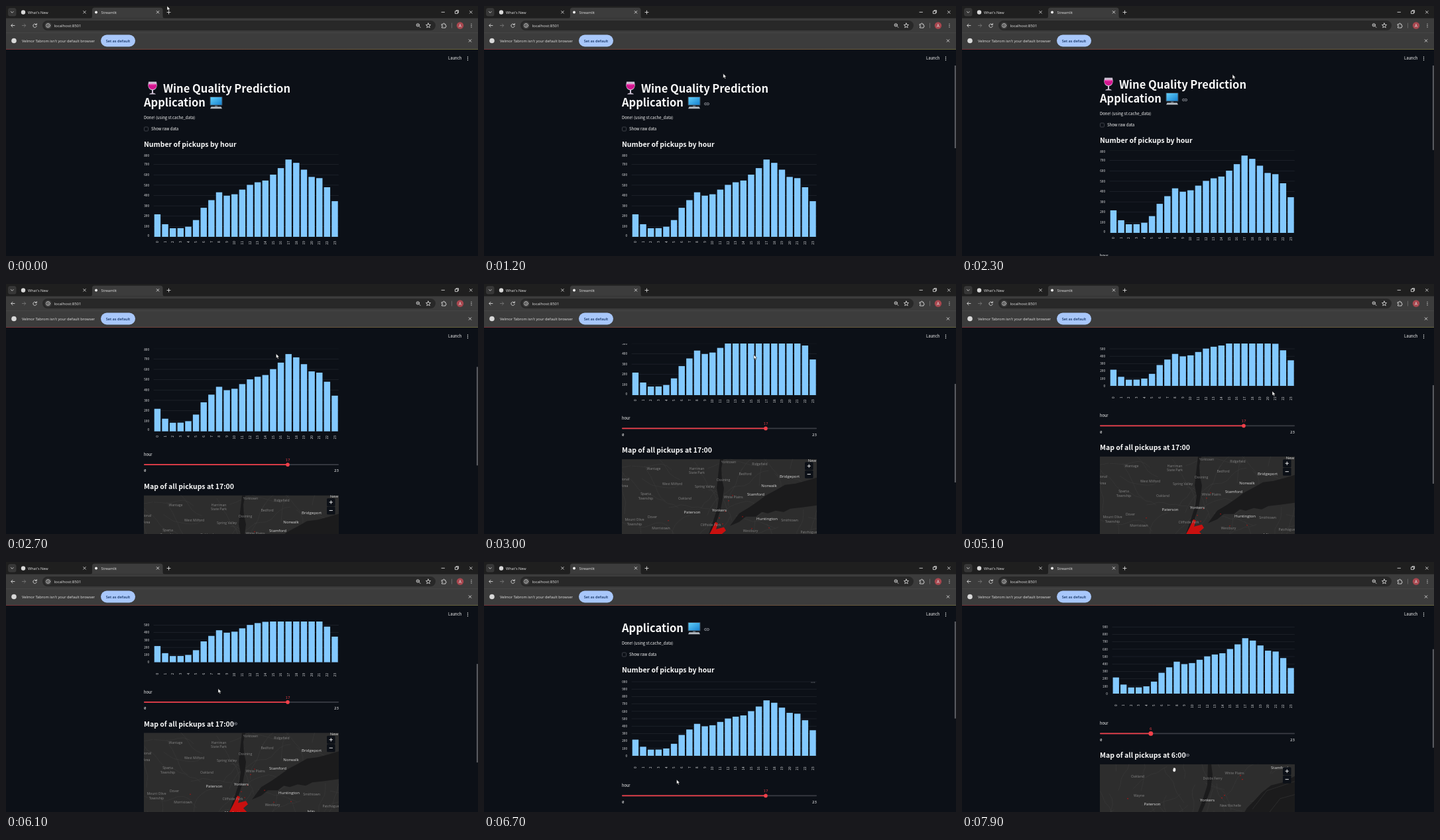
An HTML page that plays this animation: 712x378 px, repeating every 8000 ms.

```html
<!DOCTYPE html>
<html lang="en">
<head>
<meta charset="utf-8">
<title>Wine Quality Prediction</title>
<style>
  html, body { margin: 0; width: 100%; height: 100%; overflow: hidden; background: #0c1017; }
  svg { display: block; width: 100vw; height: 100vh; }
  text { font-family: "Noto Sans CJK JP", "Noto Sans CJK SC", "Noto Sans CJK", "Noto Sans", sans-serif; fill: #fafafa; white-space: pre; }
  .ui text, .map text { font-family: "Open Sans", "Noto Sans", sans-serif; }
  .ui text { fill: #e3e3e3; font-size: 5.6px; }
  .icon { fill: none; stroke: #d6d6d6; stroke-width: .9; stroke-linecap: round; stroke-linejoin: round; }
  .h1 { font-size: 16.5px; font-weight: 700; }
  .h3 { font-size: 10.5px; font-weight: 600; }
  .body { font-size: 6px; }
  .axis { font-size: 4.7px; font-weight: 500; fill: #e8e9eb; }
  .mono { font-family: "Noto Sans Mono", "DejaVu Sans Mono", monospace; font-size: 5.8px; }
  .link { fill: none; stroke: #888b92; stroke-width: .9; stroke-linecap: round; }
  .map .dim { font-size: 5.1px; fill: #858585; }
  .map .bright { font-size: 6px; fill: #dedede; }
  .road { fill: none; stroke: #3d3d3d; stroke-width: .5; }
  .water { fill: #1b1b1c; }
  .red { fill: #c9100f; }
</style>
</head>
<body>
<svg viewBox="0 0 712 378" preserveAspectRatio="none">
  <defs>
    <clipPath id="pageClip"><rect y="66" width="712" height="312"/></clipPath>
    <clipPath id="plotClip"><rect x="208" y="224" width="294" height="125.4"/></clipPath>
    <clipPath id="chartClip"><rect x="208" y="220" width="294" height="150"/></clipPath>
    <clipPath id="mapClip"><rect width="294" height="200"/></clipPath>
    <linearGradient id="stripe"><stop stop-color="#7d3338"/><stop offset="1" stop-color="#6f6c40"/></linearGradient>
    <linearGradient id="screen" x2="1" y2="1"><stop stop-color="#62d0fb"/><stop offset="1" stop-color="#1681cf"/></linearGradient>
    <path id="chain" d="M-.8-1.6H-2a1.6 1.6 0 0 0 0 3.2H-.8M.8-1.6H2a1.6 1.6 0 0 1 0 3.2H.8M-1.5 0h3"/>
    <path id="cross" d="M-1.8-1.8 1.8 1.8M1.8-1.8-1.8 1.8"/>
    <g id="dots"><circle cy="-2.4" r=".7"/><circle r=".7"/><circle cy="2.4" r=".7"/></g>
  </defs>

  <rect width="712" height="378" fill="#0c1017"/>
  <g clip-path="url(#pageClip)">
    <g id="page">
      <g transform="translate(221 124)">
        <path d="M-6-9.5h12l.8 5.500Q6 2.500 1 3.300V7.500Q4.500 8 5 9.500H-5Q-4.500 8-1 7.500V3.300Q-6 2.500-6.800-4Z" fill="#cfc3d6"/>
        <path d="M-6.200-5.500H6.200Q6.600 1.500 0 2.200-6.600 1.500-6.200-5.500Z" fill="#d3158f"/>
        <ellipse cy="-5.500" rx="6.200" ry="1.100" fill="#f04fb5"/>
      </g>
      <text class="h1" x="237" y="130.500">Wine Quality Prediction</text>
      <text class="h1" x="208" y="152.300">Application</text>
      <g transform="translate(317 146)">
        <rect x="-9.500" y="-9" width="19" height="13.500" rx="1" fill="#3b4652"/>
        <rect x="-8.500" y="-8" width="17" height="11.500" fill="url(#screen)"/>
        <path d="M-2 4.500h4v2h-4Z" fill="#5b646e"/>
        <path d="M-7.500 6.200h15l1.500 3h-18Z" fill="#b4bac1"/>
      </g>
      <use id="titleLink" class="link" href="#chain" x="336" y="148"/>
      <text class="body" x="208" y="170.800">Done! (using st.cache_data)</text>
      <rect x="208.500" y="183" width="6" height="6" rx="1.200" fill="none" stroke="#4a4d55" stroke-width=".8"/>
      <text class="body" x="219" y="188.300">Show raw data</text>
      <text class="h3" x="208" y="213.400">Number of pickups by hour</text>
      <g clip-path="url(#chartClip)">
        <g id="plot" clip-path="url(#plotClip)"></g>
        <g id="labels"></g>
        <g id="menu" fill="#a5a8ae"><circle cx="494" cy="228" r=".6"/><circle cx="496.300" cy="228" r=".6"/><circle cx="498.600" cy="228" r=".6"/></g>
      </g>
      <text class="body" x="208" y="386" style="font-size:5.700px">hour</text>
      <rect x="208" y="398.600" width="294" height="1.600" rx=".8" fill="#3a3c44"/>
      <rect id="filled" x="208" y="398.600" height="1.600" rx=".8" fill="#ee3d48"/>
      <circle id="knob" cy="399.400" r="2.800" fill="#f2404a"/>
      <text id="value" class="mono" y="394.200" text-anchor="middle" style="fill:#e23c45"></text>
      <text class="mono" x="208" y="410.600">0</text>
      <text class="mono" x="502" y="410.600" text-anchor="end">23</text>
      <text id="mapTitle" class="h3" x="208" y="436"></text>
      <use id="mapLink" class="link" href="#chain" y="432"/>
      <g class="map" transform="translate(208 445.700)" clip-path="url(#mapClip)">
        <rect width="294" height="200" fill="#2d2d2d"/>
        <g id="wide"></g>
        <g id="near"></g>
        <rect x="276" y="4.500" width="12.500" height="12" rx="1.500" fill="#0c1017"/>
        <rect x="276" y="17" width="12.500" height="12" rx="1.500" fill="#0c1017"/>
        <path class="icon" d="M280 10.500h4.500M282.250 8.250v4.500M280 23h4.500" style="stroke:#fff"/>
      </g>
    </g>
    <rect y="66" width="712" height="24" fill="#0c1017"/>
    <text class="body" x="667" y="81.300" style="font-size:5.900px">Launch</text>
    <use href="#dots" x="696.500" y="79.300" fill="#fafafa"/>
    <g id="scrollbar"><rect id="thumb" x="709.800" width="2.200" fill="#55575c"/></g>
  </g>

  <g class="ui">
    <rect width="712" height="65.500" fill="#3c3c3c"/>
    <rect width="712" height="18.500" fill="#1f1f1f"/>
    <path d="M127 18.500q3 0 3-3V6q0-3.500 3.500-3.500H233q3.500 0 3.500 3.500v9.500q0 3 3 3Z" fill="#3c3c3c"/>
    <rect x="3" y="3" width="12.500" height="12.500" rx="3.500" fill="#373737"/>
    <path class="icon" d="M7.500 8.500l1.800 1.800 1.800-1.800"/>
    <circle cx="26" cy="9.500" r="3.200" fill="#d8d8d8"/>
    <text x="33" y="11.500">What's New</text>
    <circle cx="136" cy="9.500" r="2" fill="#f2f2f2"/>
    <text x="143.500" y="11.500">Streamlit</text>
    <g class="icon">
      <use href="#cross" x="118.500" y="9.300"/><use href="#cross" x="229" y="9.300"/>
      <path d="M243 9.500h5M245.500 7v5M657 9.300h4.500"/>
      <rect x="677.800" y="7.800" width="3.600" height="3.600"/><path d="M679 7.500V6.500h3.600v3.600h-1"/>
      <use href="#cross" x="701.300" y="9.300"/>
      <path d="M13 29.500H8M10 27.200 7.700 29.500 10 31.800"/>
      <path d="M24.500 29.500h5M27.500 27.200l2.300 2.300-2.300 2.300" stroke="#777"/>
      <path d="M45.800 28.200A2.700 2.700 0 1 0 46.200 30.500M46.300 26.500v2h-2"/>
    </g>
    <rect x="55" y="22" width="593" height="15" rx="7.500" fill="#282828"/>
    <circle cx="63.500" cy="29.500" r="5.300" fill="#3c3c3c"/>
    <g class="icon">
      <circle cx="63.500" cy="29.500" r="2.900"/><path d="M63.500 29.300v1.500M63.500 27.900v.1"/>
      <circle cx="621.300" cy="28.800" r="2.200"/><path d="M623 30.500l2 2M620.300 28.800h2"/>
      <path d="M637 26l1 2.300 2.500.2-1.900 1.700.6 2.500-2.200-1.300-2.200 1.300.6-2.500-1.900-1.700 2.500-.2Z"/>
      <path d="M657.500 27.500h2q0-1.500 1-1.500t1 1.500h1.500v2q1.300 0 1.300 1t-1.300 1v1.500h-5.500v-1.800q1.300 0 1.300-.9t-1.300-.9Z"/>
      <path d="M672.500 26v7" stroke="#6a6a6a"/>
    </g>
    <text x="72.500" y="31.700" style="font-size:6.100px">localhost:8501</text>
    <circle cx="685" cy="29.500" r="5.200" fill="#a8474f"/>
    <text x="685" y="31.800" text-anchor="middle" style="font-size:6.200px">A</text>
    <use href="#dots" x="702" y="29.500" fill="#d6d6d6"/>
    <rect y="40" width="712" height=".6" fill="#4b4b4b"/>
    <circle cx="12" cy="52.500" r="3.800" fill="#d8d8d8"/>
    <text x="24" y="54.700" style="font-size:5.700px">Velmor Tabrom isn't your default browser</text>
    <rect x="143" y="43.500" width="52" height="18" rx="9" fill="#a8c7fa"/>
    <text x="169" y="54.600" text-anchor="middle" style="fill:#123263;font-weight:600">Set as default</text>
    <use class="icon" href="#cross" x="700" y="52.500"/>
    <rect y="65" width="712" height=".9" fill="url(#stripe)"/>
  </g>

  <g id="cursor">
    <path id="arrow" d="M0 0V6.600L1.500 5.300 2.600 7.700 3.800 7.200 2.700 4.900 4.700 4.800Z" fill="#fff" stroke="#111" stroke-width=".5"/>
    <path id="hand" d="M-2.500-.5-1.400-.2-1.500-2.500-.4-2.800.2-3 1.200-2.700 2.300-2.100 2.500 1 1.400 3.200H-1.200Z" fill="#fff" stroke="#111" stroke-width=".4"/>
  </g>
</svg>

<script>
const $ = id => document.getElementById(id);
const set = (node, attrs) => { for (const k in attrs) node.setAttribute(k, attrs[k]); };
const add = (parent, tag, attrs, text = '') => {
  const node = document.createElementNS('http://www.w3.org/2000/svg', tag);
  set(node, attrs);
  node.textContent = text;
  return parent.appendChild(node);
};
const show = (id, on) => { $(id).style.display = on ? '' : 'none'; };

// Chart
const counts = [218, 122, 83, 84, 98, 162, 281, 355, 431, 398, 412, 457,
  503, 528, 545, 602, 665, 748, 716, 650, 580, 568, 480, 345];
const TOP = 224, BOTTOM = 349, RIGHT = 501.8;
const ticks = Array.from({ length: 11 }, (_, i) => ({
  line: add($('plot'), 'rect', { height: .6, fill: '#252a32' }),
  label: add($('labels'), 'text', { class: 'axis', 'text-anchor': 'end' }, i * 100)
}));
const bars = counts.map((count, hour) => ({
  count,
  rect: add($('plot'), 'rect', { fill: '#83c9ff' }),
  label: add($('labels'), 'text', { class: 'axis', 'text-anchor': 'end' }, hour)
}));

function drawChart(left, unit, zero) {
  ticks.forEach(({ line, label }, i) => {
    const y = zero - i * unit;
    const visible = y > TOP - 1 && y < BOTTOM + 1;
    set(line, { x: left, y: y - .3, width: RIGHT - left });
    set(label, { x: left - 6.6, y: Math.min(347, Math.max(226, y)) + 1.7 });
    label.style.display = visible ? '' : 'none';
  });
  const step = (RIGHT - left) / 24;
  bars.forEach(({ count, rect, label }, i) => {
    const mid = left + step * (i + .5), height = count / 100 * unit;
    set(rect, { x: mid - step * .405, y: zero - height, width: step * .81, height });
    set(label, { transform: `translate(${mid + 1.7} 355.500) rotate(-90)` });
  });
}

// Maps
function drawRoads(parent, seed, amount) {
  const random = () => (seed = seed * 16807 % 2147483647) / 2147483647;
  for (let i = 0; i < amount; i++) {
    let x = random() * 294, y = random() * 150, angle = random() * 6.28, d = `M${x} ${y}`;
    for (let j = 0; j < 7; j++) {
      angle += random() - .5;
      d += `L${x += 9 * Math.cos(angle)} ${y += 9 * Math.sin(angle)}`;
    }
    add(parent, 'path', { class: 'road', d });
  }
}
function drawPlaces(parent, kind, list) {
  for (const place of list.split(';')) {
    const [name, x, y] = place.trim().split('|');
    add(parent, 'text', { class: kind, x, y: +y + 1.8, 'text-anchor': 'middle' }, name);
  }
}
const fill = (parent, kind, d) => add(parent, 'path', { class: kind, d });
const dot = (parent, cx, cy, r = .7) => add(parent, 'circle', { class: 'red', cx, cy, r });

const wide = $('wide'), near = $('near');
drawRoads(wide, 77, 55);
fill(wide, 'water', 'M163 101 177 82 192 73 205 64 217 55 232 47 246 39 262 37 277 33 294 28V70L272 73 254 75 244 80 232 78 220 82 211 80 202 87 187 87 177 95Z');
fill(wide, 'water', 'M148 0 153 0 150 14 151 30 154 44 152 60 149 76 141 100 132 125H127L137 96 144 74 146 60 143 44 145 26Z');
fill(wide, 'red', 'M141 95 145 97 142 106 154 103 157 108 150 114 160 125H126L135 108Z');
[[161, 63], [167, 55], [147, 89], [182, 87], [70, 93], [156, 79], [152, 98], [196, 105], [222, 104]]
  .forEach(([x, y]) => dot(wide, x, y));
drawPlaces(wide, 'dim', `Yorktown|161|5; Ridgefield|208|8; Harriman|113|15; State Park|113|21;
  Wantage|48|15; Bedford|186|23; Ossining|153|32; West Milford|76|38; Spring Valley|125|42;
  ational|3|31; Area|4|41; Sparta|36|53; Township|36|60; Oakland|95|60; White Plains|168|58;
  Dover|46|88; Mount Olive|19|92; Township|19|99; Morristown|59|105; Cliffside Park|134|100;
  Smithtown|253|93; Westbury|194|109; Patchogue|282|111`);
drawPlaces(wide, 'bright', `Bridgeport|253|27; Norwalk|222|41; New|287|2; Stamford|202|54;
  Paterson|106|81; Yonkers|147|78; Huntington|219|91; Manhattan|137|121; Islip|252|119`);

drawRoads(near, 4242, 50);
fill(near, 'water', 'M294 18 274 28 258 32 244 43 234 54 222 66 214 80H294Z');
fill(near, 'water', 'M163 0h5l2 16-3 22-9 24-8 18h-5l10-26 7-22Z');
fill(near, 'road', 'M230 68 252 40 294 26M250 80 272 52 294 46');
[[215, 23], [212, 17], [184, 51], [188, 47], [42, 52]].forEach(([x, y]) => dot(near, x, y, .8));
drawPlaces(near, 'dim', 'Oakland|57|18.500; Wayne|59|47.500; Dobbs Ferry|170|21.500; White Plains|203|14; New Rochelle|197|63');
drawPlaces(near, 'bright', 'Paterson|79|60.500; Yonkers|162|55; Stamford|271|5.500');

// Motion: rows of time followed by values
const scrollKeys = [[0, 0], [2100, 0], [2300, 6], [2400, 25], [2800, 160], [3000, 181], [3300, 185],
  [5100, 185], [5400, 187.5], [6100, 187.5], [6200, 160], [6400, 66], [6500, 46], [7400, 46],
  [7700, 110], [7900, 140]];
const zoomKeys = [[0, 15.62, 349], [3300, 15.62, 349], [3700, 11.2, 339]];
const cursorKeys = [[0, 243, 0], [600, 347, 138], [700, 347, 138], [1000, 349, 102], [1100, 349, 102],
  [1600, 408, 103.5], [2300, 408, 103.5], [3000, 407, 107], [3300, 407, 107], [3800, 405, 130],
  [4300, 234, 140], [4700, 524, 165], [5100, 468, 162], [5500, 400, 236], [5800, 330, 238],
  [6100, 320, 191.5], [6500, 318, 168], [6700, 290.5, 329], [6900, 285, 352], [7400, 285, 352],
  [7700, 320, 314]];

function at(keys, t) {
  const next = keys.findIndex(key => key[0] > t);
  if (next < 0) return keys[keys.length - 1].slice(1);
  const [t0, ...from] = keys[next - 1], [t1, ...to] = keys[next];
  return from.map((v, i) => v + (to[i] - v) * (t - t0) / (t1 - t0));
}

function render(t) {
  const [scroll] = at(scrollKeys, t);
  set($('page'), { transform: `translate(0 ${-scroll})` });
  drawChart(t < 7500 ? 222.6 : 226.5, ...at(zoomKeys, t));

  const hour = t < 7000 ? 17 : 6, knobX = 208.4 + 293 * hour / 23;
  set($('filled'), { width: knobX - 208 });
  set($('knob'), { cx: knobX, r: hour === 6 ? 3.4 : 2.8 });
  set($('value'), { x: knobX });
  $('value').textContent = hour;
  $('mapTitle').textContent = `Map of all pickups at ${hour}:00`;
  set($('mapLink'), { x: hour === 17 ? 345 : 339 });
  show('wide', hour === 17);
  show('near', hour === 6);

  show('titleLink', t >= 800);
  show('mapLink', t >= 5500 && t < 6200 || t >= 7700);
  show('menu', t >= 3300 && t < 6800);

  const thumbTop = 66 + .47 * scroll, shownTop = Math.max(90, thumbTop);
  set($('thumb'), { y: shownTop, height: thumbTop + 149 - shownTop });
  show('scrollbar', t >= 400);

  const [x, y] = at(cursorKeys, t);
  set($('cursor'), { transform: `translate(${x} ${y})` });
  show('arrow', t < 7700);
  show('hand', t >= 7700);
}

const start = performance.now();
function tick(now) {
  const t = Math.max(0, now - start) % 8000;
  render(Math.floor(t / 100) * 100);
  requestAnimationFrame(tick);
}
render(0);
requestAnimationFrame(tick);
</script>
</body>
</html>
```
